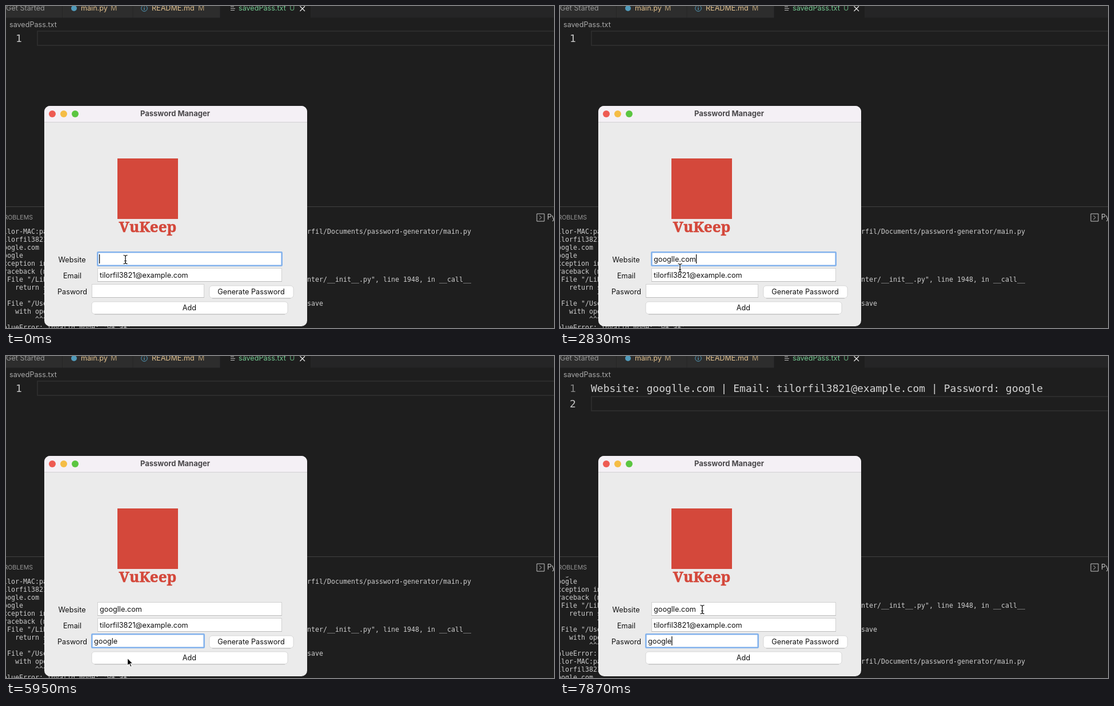
An HTML page for the animation above (8 s loop, 959x564 px).

```html
<!DOCTYPE html>
<html lang="en">
<head>
<meta charset="utf-8">
<title>Password Manager</title>
<style>
  html, body { margin: 0; width: 100%; height: 100%; overflow: hidden; background: #1e1e1e; }
  svg { display: block; font: 12.6px Inter, sans-serif; }
  text { white-space: pre; }
  .mid { text-anchor: middle; }
  .mono { font-family: "DejaVu Sans Mono", monospace; }
  #term { font-size: 11.63px; fill: #ccc; }
  .code { font-size: 18px; fill: #d4d4d4; }
  .form { font-size: 12.7px; fill: #111; }
  .field { fill: #fff; stroke: #d2d2d2; }
  .ring { fill: none; stroke: #83b2ec; stroke-width: 2.6; }
  .button { fill: #fff; stroke: #cfcfcf; stroke-width: .8; }
</style>
</head>
<body>
<svg width="959" height="564" viewBox="0 0 959 564">
  <defs>
    <clipPath id="panel"><rect y="386" width="959" height="178"/></clipPath>
    <clipPath id="win"><rect x="67" y="175" width="460" height="386" rx="10"/></clipPath>
  </defs>
  <rect width="959" height="564" fill="#1e1e1e"/>

  <!-- tabs -->
  <rect width="959" height="20.5" fill="#252526"/>
  <path d="M0 0H98V20.5H0ZM99 0H221.500V20.5H99ZM222.500 0H374V20.5H222.500Z" fill="#2d2d2d"/>
  <rect x="375" width="158" height="21" fill="#1e1e1e"/>
  <text x="0" y="8" fill="#969696">Get Started</text>
  <circle cx="119" cy="4" r="5" fill="#519aba"/>
  <g fill="#e2c08d">
    <text x="131" y="8">main.py</text>
    <text x="183" y="8" opacity=".75">M</text>
    <text x="255" y="8">README.md</text>
    <text x="336" y="8" opacity=".75">M</text>
  </g>
  <circle cx="242" cy="4" r="5.3" fill="none" stroke="#519aba"/>
  <path d="M242 3V7M242 .8V2" stroke="#519aba" stroke-width="1.3"/>
  <path d="M393 1.500H399M393 4.500H401M393 7.500H400" stroke="#b5b5b5"/>
  <g fill="#73c991">
    <text x="407" y="8">savedPass.txt</text>
    <text x="496" y="8" opacity=".8">U</text>
  </g>
  <path d="M514.500 .5L523 9M523 .5L514.500 9" stroke="#e8e8e8" stroke-width="1.3"/>

  <!-- editor -->
  <text x="6" y="37" fill="#a9a9a9">savedPass.txt</text>
  <rect id="row" x="55" y="44" width="920" height="25" fill="none" stroke="#303030" stroke-width="1.6"/>
  <g class="mono code">
    <text id="num1" x="17" y="63">1</text>
    <g id="saved">
      <text x="17" y="90" fill="#c6c6c6">2</text>
      <text x="54" y="63">Website: googlle.com | Email: tilorfil3821@example.com | Password: google</text>
    </g>
  </g>

  <!-- terminal -->
  <path d="M0 351.500H959" stroke="#414141"/>
  <text x="47" y="374" font-size="10.6" text-anchor="end" fill="#969696">PROBLEMS</text>
  <path d="M929 364H942V377H929ZM933.500 367L937 370.500L933.500 374" fill="none" stroke="#c5c5c5"/>
  <text x="947" y="374" fill="#c5c5c5">Python</text>
  <g clip-path="url(#panel)"><g id="term" class="mono"></g></g>

  <!-- window -->
  <g clip-path="url(#win)">
    <rect x="67" y="175" width="460" height="386" fill="#ebebeb"/>
    <rect x="67" y="175" width="460" height="28" fill="#f4f0f5"/>
    <path d="M67 203.500H527" stroke="#d2cfd3"/>
  </g>
  <circle cx="81" cy="189" r="6" fill="#ee5b52"/>
  <circle cx="101" cy="189" r="6" fill="#f5bd45"/>
  <circle cx="121" cy="189" r="6" fill="#5bc641"/>
  <text class="mid" x="296" y="193" font-size="13" font-weight="650" fill="#4a484b">Password Manager</text>

  <rect x="195" y="267" width="106" height="106" fill="#d4483b"/>
  <text class="mid" x="248" y="396" fill="#d4483b" stroke="#d4483b" stroke-width=".6"
    style="font:900 26px 'Noto Serif',serif">VuKeep</text>

  <g class="form">
    <text class="mid" x="115.500" y="449">Website</text>
    <text class="mid" x="116" y="477">Email</text>
    <text class="mid" x="116" y="505">Pasword</text>
    <rect class="field" x="160.500" y="431.500" width="322" height="23"/>
    <rect class="field" x="160.500" y="459.500" width="322" height="23"/>
    <rect class="field" x="150.500" y="487.500" width="196" height="23"/>
    <path d="M160 454.500H483M160 482.500H483M150 510.500H347" stroke="#bdbdbd"/>
    <rect id="siteRing" class="ring" x="160.300" y="431.300" width="322.400" height="23.400" rx="1"/>
    <rect id="passRing" class="ring" x="150.300" y="487.300" width="196.400" height="23.400" rx="1"/>
    <text id="site" x="164" y="448"></text>
    <text x="164" y="476">tilorfil3821@example.com</text>
    <text id="pass" x="154" y="504"></text>
    <rect class="button" x="356" y="490" width="147" height="21.500" rx="5"/>
    <rect class="button" x="150" y="518" width="343" height="21.500" rx="5"/>
    <path d="M361 512H498M155 540H488" stroke="#bcbcbc"/>
    <text class="mid" x="429" y="505">Generate Password</text>
    <text class="mid" x="321" y="533">Add</text>
  </g>
  <rect id="caret" width="1.200" height="16" fill="#000"/>

  <g id="mouse">
    <g id="beam" fill="none">
      <path id="beamLine" d="M-3.500 -7.500Q0 -7.500 0 -5Q0 -7.500 3.500 -7.500M0 -5V5M-3.500 7.500Q0 7.500 0 5Q0 7.500 3.500 7.500M-2 2.500H2" stroke="#fff" stroke-width="3"/>
      <use href="#beamLine"/>
    </g>
    <path id="arrow" d="M0 0V13.500L3.200 10.600L5.400 15.600L7.600 14.600L5.400 9.800H9.600Z" stroke="#fff" stroke-width="1.100"/>
  </g>
</svg>
<script>
const $ = id => document.getElementById(id);
const LOOP = 8000, TICK = 148.5;

// Terminal rows: [row, column, text]
const rows = [
  [0, 0, 'tilor-MAC:password-generator'], [0, 77, 'rfil/Documents/password-generator/main.py'],
  [1, 0, 'tilorfil3821@example.com'],
  [2, 0, 'google.com'],
  [3, 0, 'google'],
  [4, 0, 'Exception in Tkinter callback'],
  [5, 0, 'Traceback (most recent call last):'],
  [6, 2, 'File "/Library'], [6, 77, 'nter/__init__.py", line 1948, in __call__'],
  [7, 4, 'return self.func(*args)'],
  [8, 11, '^^^^^^^^'],
  [9, 2, 'File "/Users'], [9, 77, 'save'],
  [10, 4, 'with open('],
  [11, 9, '^^^^^^'],
  [12, 0, "ValueError: invalid mode: 'w+ a+'"],
  [13, 0, 'tilor-MAC:password-generator'], [13, 77, 'rfil/Documents/password-generator/main.py'],
  [14, 0, 'tilorfil3821@example.com'],
  [15, 0, 'google.com']
];
for (const [row, col, str] of rows) {
  const el = document.createElementNS('http://www.w3.org/2000/svg', 'text');
  el.setAttribute('x', 7 * col - 12);
  el.setAttribute('y', 398.7 + 14 * row);
  el.textContent = str;
  $('term').append(el);
}

// Time of each keystroke
const siteKeys = [300, 450, 600, 750, 890, 890, 1040, 1640, 1790, 2090, 2240];
const passKeys = [4620, 4770, 4910, 5060, 5210, 5360];
const caretOff = [[2980, 3280], [4470, 4620], [5950, 6390], [6980, 7280]];
const FOCUS = 3870, SCROLL = 6090, SAVE = 6530;

// Pointer stops: [tick, x, y]
const path = [
  [0, 209, 444], [16, 209, 444], [18, 208, 543], [19, 210, 459], [24, 196, 503],
  [37, 196, 503], [40, 212.5, 529], [42, 212.5, 529], [45, 235, 480],
  [47, 285, 446], [50, 208, 444], [52, 208, 444], [53, 249, 444], [54, 249, 444]
];

const typed = (str, keys, t) => str.slice(0, keys.filter(k => k <= t).length);
const show = (id, on) => $(id).setAttribute('visibility', on ? 'visible' : 'hidden');

function pointer(t) {
  const tick = Math.min(53, Math.floor((t + 8) / TICK));
  const i = path.findIndex(p => p[0] > tick);
  const [a, ax, ay] = path[i - 1], [b, bx, by] = path[i];
  const k = (tick - a) / (b - a);
  return [ax + (bx - ax) * k, ay + (by - ay) * k];
}

function draw(t) {
  const onPass = t >= FOCUS, saved = t >= SAVE;
  $('site').textContent = typed('googlle.com', siteKeys, t);
  $('pass').textContent = typed('google', passKeys, t);
  show('siteRing', !onPass);
  show('passRing', onPass);

  const field = $(onPass ? 'pass' : 'site');
  const width = field.textContent ? field.getComputedTextLength() : 0;
  $('caret').setAttribute('x', (onPass ? 153 : 163) + width + (width ? 1 : 0));
  $('caret').setAttribute('y', onPass ? 491 : 435);
  show('caret', !caretOff.some(([from, to]) => t >= from && t < to));

  $('term').setAttribute('transform', `translate(0 ${t >= SCROLL ? -42 : 0})`);
  show('saved', saved);
  $('row').setAttribute('y', saved ? 71 : 44);
  $('num1').setAttribute('fill', saved ? '#858585' : '#c6c6c6');

  const [x, y] = pointer(t);
  $('mouse').setAttribute('transform', `translate(${x} ${y})`);
  show('beam', y < 514);
  show('arrow', y >= 514);
}

$('beam').lastElementChild.remove();
const core = $('beamLine').cloneNode();
core.removeAttribute('id');
core.setAttribute('stroke', '#000');
core.setAttribute('stroke-width', 1.2);
$('beam').append(core);

function loop() {
  draw(performance.now() % LOOP);
  requestAnimationFrame(loop);
}
loop();
</script>
</body>
</html>
```
